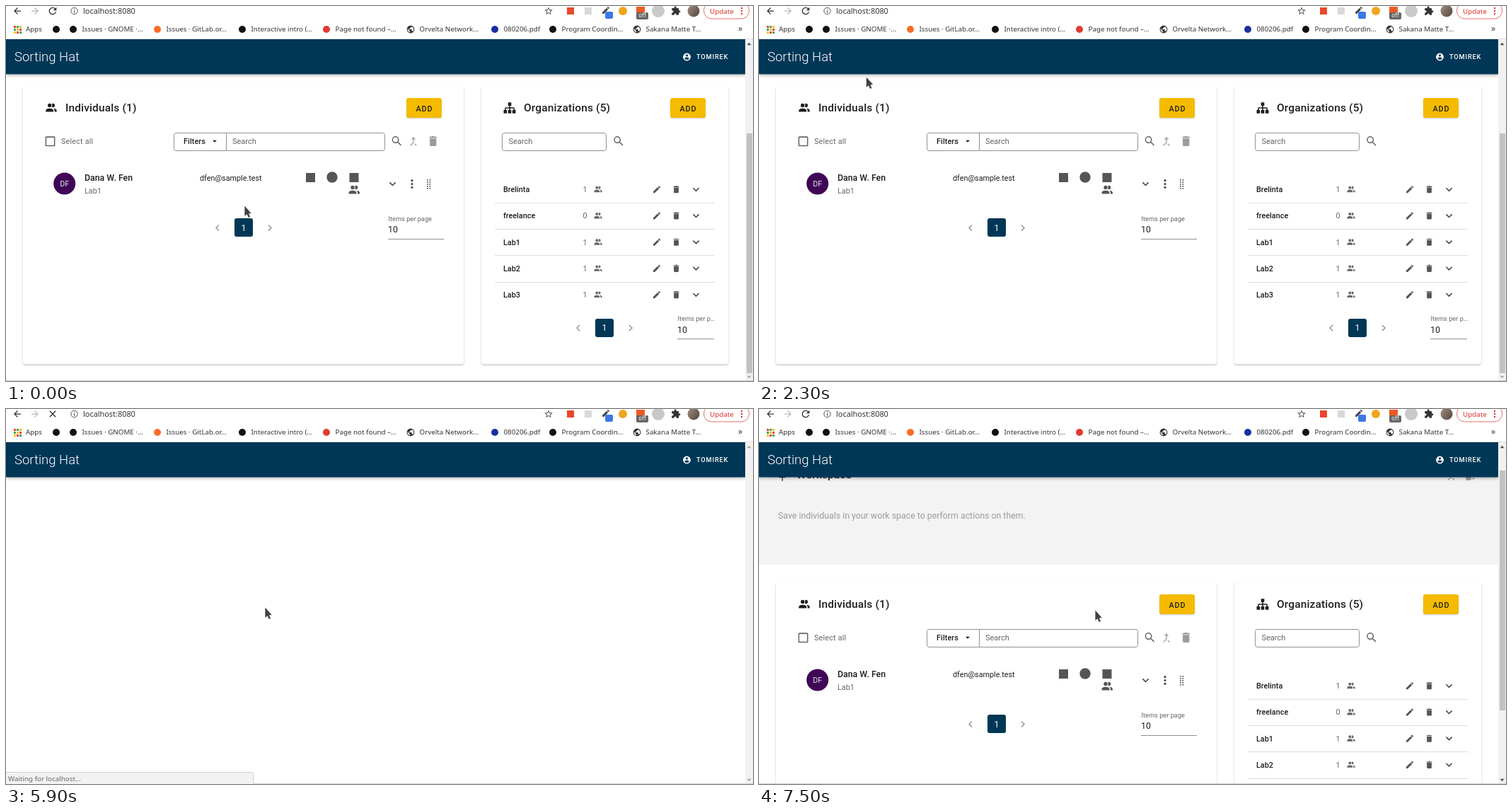
These frames come from a looping animation (1056 px wide and 530 px high, 8000 ms). An HTML page with a canvas:

```html
<!DOCTYPE html>
<html lang="en">
<head>
<meta charset="utf-8">
<title>Sorting Hat</title>
<style>
  html, body { margin: 0; width: 100%; height: 100%; overflow: hidden; background: #fff; }
  canvas { display: block; }
</style>
</head>
<body>
<canvas id="stage" width="1056" height="530"></canvas>
<script>
const ctx = document.getElementById("stage").getContext("2d");
const LOOP = 8000, STEP = 100;
const ROBOTO = "Roboto, sans-serif", FALLBACK = '"Liberation Sans", sans-serif', UI = '"Noto Sans", sans-serif';
const NAVY = "#003756", INK = "#1e1e1e", GREY = "#666", MUTED = "#9b9b9b", LINE = "#909090";

const ICONS = Object.fromEntries(Object.entries({
  people: "M16 17v2H2v-2s0-4 7-4 7 4 7 4M12.5 7.5A3.5 3.5 0 1 0 9 11a3.5 3.5 0 0 0 3.5-3.5M15.94 13A5.3 5.3 0 0 1 18 17v2h4v-2s0-3.63-6.06-4M15 4a3.4 3.4 0 0 0-1.93.59 5 5 0 0 1 0 5.82A3.4 3.4 0 0 0 15 11a3.5 3.5 0 0 0 0-7z",
  sitemap: "M9 2v6h2v3H5a2 2 0 0 0-2 2v3H1v6h6v-6H5v-3h6v3H9v6h6v-6h-2v-3h6v3h-2v6h6v-6h-2v-3a2 2 0 0 0-2-2h-6V8h2V2z",
  checkbox: "M19 3H5a2 2 0 0 0-2 2v14a2 2 0 0 0 2 2h14a2 2 0 0 0 2-2V5a2 2 0 0 0-2-2m0 2v14H5V5z",
  search: "M9.5 3a6.5 6.5 0 0 1 4.94 10.73l.27.27h.79l5 5-1.5 1.5-5-5v-.79l-.27-.27A6.5 6.5 0 1 1 9.5 3m0 2a4.5 4.5 0 1 0 0 9 4.5 4.5 0 0 0 0-9z",
  merge: "M17 20.41 18.41 19 15 15.59 13.59 17M7.5 8H11v5.59L5.59 19 7 20.41l6-6V8h3.5L12 3.5",
  trash: "M19 4h-3.5l-1-1h-5l-1 1H5v2h14M6 19a2 2 0 0 0 2 2h8a2 2 0 0 0 2-2V7H6z",
  sweep: "M15 16h4v2h-4zM15 8h7v2h-7zM15 12h6v2h-6zM3 18a2 2 0 0 0 2 2h6a2 2 0 0 0 2-2V8H3zM14 5h-3l-1-1H6L5 5H2v2h12z",
  pencil: "M20.71 7.04a1 1 0 0 0 0-1.41l-2.34-2.34a1 1 0 0 0-1.41 0l-1.84 1.83 3.75 3.75M3 17.25V21h3.75L17.81 9.93l-3.75-3.75z",
  down: "M7.41 8.58 12 13.17l4.59-4.59L18 10l-6 6-6-6z",
  left: "M15.41 16.58 10.83 12l4.58-4.59L14 6l-6 6 6 6z",
  right: "M8.59 16.58 13.17 12 8.59 7.41 10 6l6 6-6 6z",
  caret: "M7 10l5 5 5-5z",
  pin: "M16 12V4h1V2H7v2h1v8l-2 2v2h5.2v6h1.6v-6H18v-2z",
  account: "M12 19.2A7.2 7.2 0 0 1 6 16c0-2 4-3.1 6-3.1s6 1.1 6 3.1a7.2 7.2 0 0 1-6 3.2M12 5a3 3 0 1 1 0 6 3 3 0 0 1 0-6m0-3a10 10 0 1 0 0 20 10 10 0 0 0 0-20z",
  back: "M20 11v2H8l5.5 5.5-1.42 1.42L4.16 12l7.92-7.92L13.5 5.5 8 11z",
  forward: "M4 11v2h12l-5.5 5.5 1.42 1.42L19.84 12l-7.92-7.92L10.5 5.5 16 11z",
  reload: "M17.65 6.35A8 8 0 1 0 19.73 14h-2.08A6 6 0 1 1 16.22 7.78L13 11h7V4z",
  stop: "M19 6.41 17.59 5 12 10.59 6.41 5 5 6.41 10.59 12 5 17.59 6.41 19 12 13.41 17.59 19 19 17.59 13.41 12z",
  star: "M12 15.39l-3.76 2.27.99-4.28-3.32-2.88 4.38-.37L12 6.09l1.71 4.04 4.38.37-3.32 2.88.99 4.28M22 9.24l-7.19-.61L12 2 9.19 8.63 2 9.24l5.45 4.73L5.82 21 12 17.27 18.18 21l-1.64-7.03z",
  puzzle: "M20.5 11H19V7a2 2 0 0 0-2-2h-4V3.5a2.5 2.5 0 0 0-5 0V5H4a2 2 0 0 0-2 2v3.8h1.5a2.7 2.7 0 0 1 0 5.4H2V20a2 2 0 0 0 2 2h3.8v-1.5a2.7 2.7 0 0 1 5.4 0V22H17a2 2 0 0 0 2-2v-4h1.5a2.5 2.5 0 0 0 0-5z",
  globe: "M17.9 17.39A2 2 0 0 0 16 16h-1v-3a1 1 0 0 0-1-1H8v-2h2a1 1 0 0 0 1-1V7h2a2 2 0 0 0 2-2v-.41a8 8 0 0 1 2.9 12.8M11 19.93A8 8 0 0 1 4.21 10.21L9 15v1a2 2 0 0 0 2 2M12 2a10 10 0 1 0 0 20 10 10 0 0 0 0-20z"
}).map(([name, d]) => [name, new Path2D(d)]));

const POINTERS = {
  arrow: new Path2D("M.4.4V15L3.5 12.2 5.8 17 8 16 6 11.2H9.8Z"),
  hand: new Path2D("M-1.8 1Q0-1 1.6 1V5.5L8 7.2Q9.6 8 9.3 10.5L8 16H0L-5 10Q-4.5 7.5-1.8 9.5Z")
};

// Pointer moves: first step, last step, end position, shape
const START = { x: 337, y: 282, shape: "arrow" };
const MOVES = [
  [500, 600, 348, 258, "hand"], [700, 800, 345, 340, "arrow"], [900, 1000, 353, 331, "arrow"],
  [1500, 1500, 298, 266, "hand"], [1600, 1800, 236, 181, "hand"], [2100, 2500, 95, 46, "arrow"],
  [3400, 3400, 66, 7, "arrow"], [4600, 4700, 238, 217, "arrow"], [5900, 5900, 366, 280, "arrow"],
  [6200, 6200, 400, 300, "arrow"], [6500, 6500, 425, 315, "beam"], [6700, 6800, 487, 312, "beam"],
  [7000, 7000, 527, 379, "hand"], [7200, 7200, 462, 314, "beam"], [7400, 7500, 475, 284, "arrow"]
];

function pointerAt(t) {
  let p = START;
  for (const [from, to, x, y, shape] of MOVES) {
    if (t < from) break;
    const k = Math.min(1, (t - from + STEP) / (to - from + STEP));
    p = { x: p.x + (x - p.x) * k, y: p.y + (y - p.y) * k, shape };
  }
  return p;
}

function text(str, x, y, { size = 10.8, color = INK, weight = 400, gap = 0, font = ROBOTO, align = "left" } = {}) {
  ctx.font = `${weight} ${size}px ${font}`;
  ctx.letterSpacing = gap + "px";
  ctx.textAlign = align;
  ctx.fillStyle = color;
  ctx.fillText(str, x, Math.round(y + size * 0.36));
}

function icon(name, x, y, size = 18.5, color = INK) {
  ctx.save();
  ctx.translate(x - size / 2, y - size / 2);
  ctx.scale(size / 24, size / 24);
  ctx.fillStyle = color;
  ctx.fill(ICONS[name]);
  ctx.restore();
}

function rect(x, y, w, h, color) {
  ctx.fillStyle = color;
  ctx.fillRect(x, y, w, h);
}

function box(x, y, w, h, r, fill, stroke) {
  ctx.beginPath();
  ctx.roundRect(x, y, w, h, r);
  if (fill) { ctx.fillStyle = fill; ctx.fill(); }
  if (stroke) { ctx.strokeStyle = stroke; ctx.lineWidth = 1; ctx.stroke(); }
}

function dot(x, y, r, color) {
  ctx.beginPath();
  ctx.arc(x, y, r, 0, 2 * Math.PI);
  ctx.fillStyle = color;
  ctx.fill();
}

function withShadow(alpha, blur, dy, paint) {
  ctx.save();
  ctx.shadowColor = `rgba(0,0,0,${alpha})`;
  ctx.shadowBlur = blur;
  ctx.shadowOffsetY = dy;
  paint();
  ctx.restore();
}

function drawBrowser(t) {
  const bar = { size: 9.8, font: UI, color: "#333" };
  rect(0, 0, 1056, 46, "#fff");
  rect(0, 46, 1056, 1, "#dadce0");
  if (t >= 3400 && t < 3900) dot(66, 7, 9, "#d5d6d8");
  icon("back", 16, 7, 15, "#333");
  icon("forward", 41, 7, 15, "#b8b8b8");
  icon(t >= 3900 && t < 6200 ? "stop" : "reload", 66, 7, 16, "#333");
  ctx.beginPath();
  ctx.arc(96.5, 7, 4.7, 0, 7);
  ctx.strokeStyle = "#555";
  ctx.lineWidth = 1;
  ctx.stroke();
  rect(96, 6, 1, 4, "#555");
  rect(96, 4, 1, 1, "#555");
  text("localhost:8080", 109, 7, { ...bar, size: 10.9 });

  icon("star", 767, 7, 14, "#555");
  rect(793, 2, 10, 10, "#e8472b");
  rect(818, 2, 10, 10, "#d8d8d8");
  icon("pencil", 848, 6, 13, "#444");
  box(847, 8, 11, 10, 2, "#3b78e7");
  dot(872, 7, 6, "#f0a51c");
  rect(891, 1, 12, 11, "#ee5a24");
  box(891, 9, 17, 10, 2, "#666");
  text("off", 899.5, 13.5, { ...bar, size: 8, color: "#fff", align: "center" });
  dot(922, 7, 9, "#c9c9c9");
  icon("puzzle", 947, 7, 14, "#333");
  const photo = ctx.createLinearGradient(963, 0, 981, 14);
  photo.addColorStop(0, "#a09080");
  photo.addColorStop(1, "#54443c");
  dot(972, 7, 8.5, photo);
  box(986.5, -5, 64, 23, 11, "#fff", "#e2726b");
  text("Update", 995, 7, { ...bar, weight: 500, color: "#d93025" });
  for (const y of [3, 7, 11]) dot(1040, y, 1.2, "#d93025");

  const grid = ["#ea4335", "#34a853", "#fbbc05"];
  for (let i = 0; i < 9; i++) rect(11 + i % 3 * 4, 28 + Math.floor(i / 3) * 4, 3, 3, grid[(i + Math.floor(i / 3)) % 3]);
  text("Apps", 28, 32.5, bar);
  dot(71, 33, 5, "#111");
  const bookmarks = [
    [95, "#111", "Issues · GNOME ·…"], [214, "#fc6d26", "Issues · GitLab.or…"], [334, "#111", "Interactive intro (…"],
    [453, "#e03a2f", "Page not found –…"], [572, null, "Orvelta Network…"], [691, "#1a2fa0", "080206.pdf"],
    [773, "#111", "Program Coordin…"], [892, null, "Sakana Matte T…"]
  ];
  for (const [x, color, label] of bookmarks) {
    if (color) dot(x, 33, 5, color);
    else icon("globe", x, 33, 13, "#333");
    text(label, x + 12.5, 32.5, bar);
  }
  text("»", 1035, 32, { ...bar, size: 12 });
}

function drawPager(mid, y, itemsX, width, label, loaded, font) {
  const reach = loaded ? 37 : 20.5;
  icon("left", mid - reach, y, 18.5, MUTED);
  icon("right", mid + reach, y, 18.5, MUTED);
  if (loaded) {
    box(mid - 13, Math.floor(y - 13), 26, 26, 3, NAVY);
    text("1", mid, y, { size: 12.35, color: "#fff", align: "center", font });
  }
  text(label, itemsX + 0.5, y - 13, { size: 9.26, color: GREY, font });
  text("10", itemsX, y + 2.5, { size: 12.35, font });
  rect(itemsX, Math.round(y + 15), width, 1, LINE);
}

function drawCard(x, width, glyph, title, addX, heading) {
  withShadow(0.22, 3, 1.5, () => box(x, 286, width, 393, 3, "#fff"));
  icon(glyph, x + 40, 317);
  text(title, x + 60, 316.4, { size: 15.44, weight: 500, gap: 0.15, font: heading });
  withShadow(0.2, 2, 1, () => box(addX, 303, 50, 28, 3, "#f5bb00"));
  text("ADD", addX + 25.5, 318, { weight: 500, gap: 0.96, align: "center", font: heading });
}

function drawIndividual(hover) {
  if (hover) rect(43, 401, 586, 48, "#ebebeb");
  dot(82.7, 424, 15.5, "#3f0557");
  text("DF", 82.7, 424, { color: "#eadcf0", align: "center" });
  text("Dana W. Fen", 111, 416, { size: 12.35, weight: 500 });
  text("Lab1", 111, 434, { color: GREY });
  text("dfen@sample.test", 274, 416);
  rect(424, 409, 13, 13, "#555");
  dot(461, 415, 7.7, "#555");
  rect(485.5, 409, 13, 13, "#555");
  icon("people", 492.3, 433, 18.5, "#555");
  icon("down", 546.5, 424.5, 18.5, "#444");
  for (const d of [-4.8, 0, 4.8]) dot(574, 424.5 + d, 1.6, "#444");
  for (let i = 0; i < 10; i++) rect(595 + i % 2 * 3.5, 418 + Math.floor(i / 2) * 3, 1.7, 1.7, "#555");
}

function drawOrganizations() {
  const rowHeight = 37.2;
  [["Brelinta", 1], ["freelance", 0], ["Lab1", 1], ["Lab2", 1], ["Lab3", 1]].forEach(([name, count], i) => {
    const y = 432.3 + i * rowHeight;
    text(name, 703, y, { weight: 500 });
    text(count, 815.5, y, { color: GREY });
    icon("people", 837, y, 13.5, GREY);
    icon("pencil", 920, y, 13.5, "#555");
    icon("trash", 947.5, y, 13.5, "#555");
    icon("down", 975.5, y, 18.5, "#444");
    if (i < 4) rect(691, Math.round(y + rowHeight / 2), 311, 1, "#dedede");
  });
}

function drawPage({ loaded, scroll, hover, heading, body }) {
  ctx.save();
  ctx.translate(0, -scroll);
  rect(0, 97, 1045, 164, "#f3f3f3");
  icon("pin", 33, 135);
  text("Workspace", 53, 133.4, { size: 15.44, weight: 500, gap: 0.08, font: heading });
  icon("merge", 978.5, 135.5, 18.5, MUTED);
  icon("sweep", 1006, 135.5, 18.5, MUTED);
  text("Save individuals in your work space to perform actions on them.", 27, 192, { size: 12.35, color: MUTED, font: body });

  drawCard(24, 623, "people", `Individuals (${loaded ? 1 : 0})`, 566, heading);
  drawCard(672, 349, "sitemap", `Organizations (${loaded ? 5 : 0})`, 939, heading);

  const soft = { color: "#666", font: body };
  icon("checkbox", 62.5, 364.3, 18.5, GREY);
  text("Select all", 78, 364, { ...soft, gap: 0.19 });
  box(237.5, 352.5, 298, 25, 3, null, LINE);
  rect(311, 352, 1, 25, LINE);
  text("Filters", 251, 364, { weight: 500, gap: 0.1, font: heading });
  icon("caret", 295, 364, 14);
  text("Search", 320, 364, { ...soft, size: 11 });
  icon("search", 552.5, 364, 18.5, GREY);
  icon("merge", 576, 364.5, 18.5, "#a8a8a8");
  icon("trash", 603.7, 364, 18.5, MUTED);
  box(701.5, 352.5, 147, 25, 3, null, LINE);
  text("Search", 710.5, 364, { ...soft, size: 11 });
  icon("search", 866, 364, 18.5, GREY);

  if (loaded) {
    drawIndividual(hover);
    drawOrganizations();
  } else {
    const empty = { color: MUTED, font: body, align: "center" };
    text("No data available", 336, 418, empty);
    text("No data available", 846, 433, empty);
  }
  drawPager(336, loaded ? 486.5 : 474.5, 540, 79, "Items per page", loaded, body);
  drawPager(846, loaded ? 628 : 480, 949, 52, loaded ? "Items per p…" : "Items per …", loaded, body);
  ctx.restore();
}

function drawScrollbar({ blank, loaded, scroll }) {
  rect(1045, 47, 11, 483, "#f1f1f1");
  const arrow = (y, dir, active) => {
    ctx.beginPath();
    ctx.moveTo(1047.5, y + 1.7 * dir);
    ctx.lineTo(1053.5, y + 1.7 * dir);
    ctx.lineTo(1050.5, y - 1.7 * dir);
    ctx.fillStyle = active ? "#505050" : "#a9a9a9";
    ctx.fill();
  };
  arrow(53.5, 1, scroll > 0);
  arrow(524.5, -1, !blank && scroll < 173);
  if (!blank) rect(1047, Math.round(58 + scroll * 0.705), 8, loaded ? 339 : 435, "#c1c1c1");
}

function drawStatus(t) {
  if (t < 3700 || t >= 6700) return;
  ctx.save();
  ctx.globalAlpha = t >= 6500 ? 0.35 : 1;
  box(-4, 513.5, 354, 25, 3, "#f2f2f2", "#cfcfcf");
  text("Waiting for localhost...", 3, 522, { size: 9.8, color: "#666", font: UI });
  ctx.restore();
}

function drawPointer({ x, y, shape }) {
  ctx.save();
  ctx.translate(x, y);
  if (shape === "beam") {
    rect(-0.5, -6, 1, 12, "#333");
    for (const end of [-7, 6]) {
      rect(-3, end, 2.5, 1, "#333");
      rect(0.5, end, 2.5, 1, "#333");
    }
  } else {
    ctx.lineJoin = "round";
    ctx.lineWidth = 1.4;
    ctx.strokeStyle = "rgba(255,255,255,.85)";
    ctx.stroke(POINTERS[shape]);
    ctx.fillStyle = "#414141";
    ctx.fill(POINTERS[shape]);
  }
  ctx.restore();
}

function draw(t) {
  const view = {
    blank: t >= 5100 && t < 6200,
    loaded: t < 5100 || t >= 6700,
    scroll: t < 5100 ? 173 : t >= 6800 ? 41 : 0,
    hover: (t >= 500 && t < 700) || (t >= 7000 && t < 7200),
    heading: t >= 5100 && t < 6500 ? FALLBACK : ROBOTO,
    body: t >= 5100 && t < 6700 ? FALLBACK : ROBOTO
  };
  rect(0, 0, 1056, 530, "#fff");
  if (!view.blank) drawPage(view);
  withShadow(0.35, 5, 2, () => rect(0, 47, 1045, 49.4, NAVY));
  text("Sorting Hat", 12, 71.4, { size: 18.5, weight: 300, color: "#fff" });
  icon("account", 962.5, 72, 13, "#fff");
  text("TOMIREK", 976, 72, { size: 9.26, weight: 500, gap: 0.83, color: "#fff" });
  drawScrollbar(view);
  rect(0, 529, 1056, 1, "#d4d4d4");
  drawBrowser(t);
  drawStatus(t);
  drawPointer(pointerAt(t));
}

function tick(now) {
  draw(Math.floor(now % LOOP / STEP) * STEP);
  requestAnimationFrame(tick);
}
requestAnimationFrame(tick);
</script>
</body>
</html>
```
